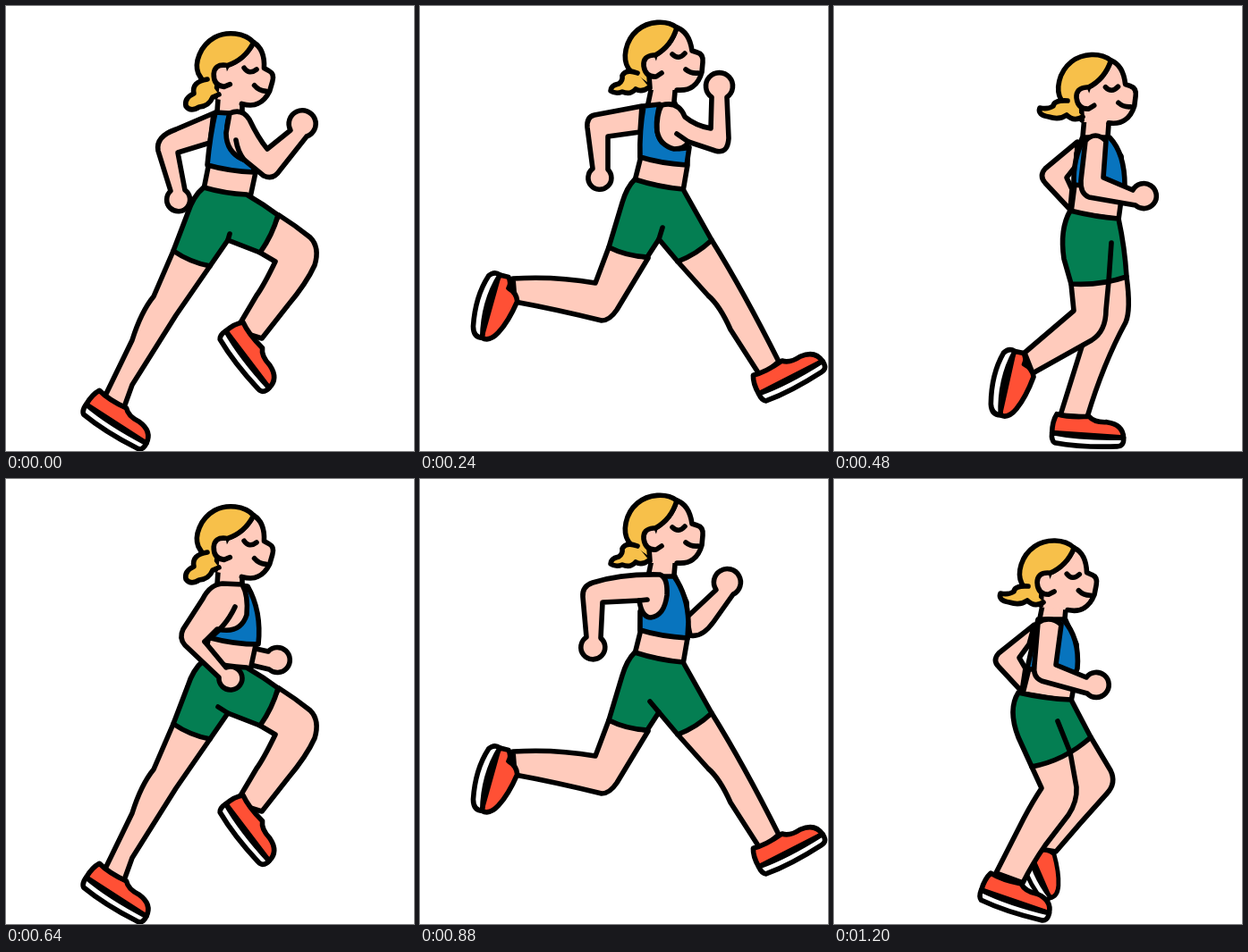
These frames come from a looping animation (456 px wide and 498 px high, 1.28 s). An HTML page:

```html
<!DOCTYPE html>
<html lang="en">
<head>
<meta charset="utf-8">
<title>Runner</title>
<style>
  html, body { margin: 0; width: 100%; height: 100%; overflow: hidden; background: #fff; }
  svg { display: block; width: 100%; height: 100%; }
  path { stroke: #000; stroke-width: 5.6; stroke-linejoin: round; stroke-linecap: round; }
  .skin { fill: #ffcbbc; }
  .bare { fill: #ffcbbc; stroke: none; }
  .green { fill: #047e52; }
  .blue { fill: #0874be; }
  .red { fill: #ff5035; }
  .white { fill: #fff; }
  .hair { fill: #f7c04a; }
  .line { fill: none; }
  g[data-scene] { visibility: hidden; }
</style>
</head>
<body>
<svg id="stage" viewBox="0 0 456 498"></svg>
<script>
const shape = cls => d => `<path class="${cls}" d="${d}"/>`;
const [skin, bare, green, blue, red, white, hair, line] =
  ['skin', 'bare', 'green', 'blue', 'red', 'white', 'hair', 'line'].map(shape);

const place = (x, y, turn, art) =>
  `<g transform="translate(${x} ${y}) rotate(${turn})">${art}</g>`;

// Shoes: origin at the middle of the ankle opening, toe to the right.
const flatShoe =
  red('M-18,-2 Q-4,2 18,0 Q24,7 38,6 Q56,8 57,23 L-23,19 Q-23,6 -18,-2Z') +
  white('M-23,19 Q10,25 57,23 Q58,33 50,33 Q10,35 -20,30 Q-24,27 -23,19Z');
const bentShoe =
  red('M-20,5 Q-14,0 -8,2 Q-5,-8 4,-11 Q28,-7 43,1 Q56,8 53,18 L-20,16Z') +
  white('M-20,15 Q14,26 53,17 Q55,27 43,30 Q10,36 -16,27 Q-23,22 -20,15Z');
const shoe = (x, y, turn) => place(x, y, turn, flatShoe);
const bent = (x, y, turn) => place(x, y, turn, bentShoe);

// Head: origin at the ear.
const backHair = hair('M26,-43 C14,-52 -6,-50 -18,-40 C-32,-28 -35,-8 -28,3 Q-21,12 -12,18 Q-7,22 -4,25 L-5,11 L2,-12 Q20,-22 26,-43Z');
const face =
  bare('M0,-12 L-5,27 L27,27 L27,-22Z') +
  skin('M2,-12 Q20,-22 26,-43 Q40,-38 43,-17 L49,-15 Q56,-13 55,-4 L54,7 Q51,18 44,23 Q38,28 26,27');
const features =
  skin('M0,-12 Q-12,-11 -11,0 Q-9,13 3,12 L9,8') +
  line('M21,-13 Q28,-6 35,-14') +
  line('M36,4 Q42,9 50,8');

const tails = {
  low: 'M-18,4 Q-36,7 -33,20 Q-44,25 -42,34 Q-37,41 -27,35 Q-16,34 -12,24 L-5,21',
  mid: 'M-18,8 Q-31,3 -35,11 Q-34,17 -39,20 Q-48,22 -48,28 Q-42,32 -35,29 Q-26,33 -20,26 Q-13,30 -5,24',
  high: 'M-21,3 Q-36,2 -37,9 Q-43,13 -52,11 Q-55,19 -42,21 Q-30,25 -22,19 Q-14,27 -4,21'
};

const bodies = {
  push: {
    head: [243, 78, 11], tail: 'low',
    torso: 'M238,90 L236,118 L229,150 L226,180 L221,205 L273,214 L279,186 L276,140 L264,118 L264,95Z',
    legs: skin('M187,274 L165,325 Q151,342 141,374 L109,440 L132,449 L141,424 L190,346 L228,291Z') +
      shoe(119, 441, 30) +
      skin('M305,234 Q324,246 340,259 Q351,270 345,290 Q336,310 315,335 L286,372 L257,363 L280,324 Q288,313 301,286 L284,276Z') +
      shoe(275, 369, 50),
    shorts: 'M221,203 Q245,210 269,211 Q288,222 304,234 Q298,256 284,276 L248,262 L228,291 Q206,287 187,274 L203,232 Q209,213 221,203Z'
  },
  fly: {
    head: [253, 61, 3], tail: 'mid',
    torso: 'M253,74 L247,103 L239,134 L238,166 L232,190 L286,201 L291,172 L290,130 L276,101 L278,79Z',
    legs: skin('M199,262 L175,300 Q130,322 68,348 L78,374 Q130,357 180,342 Q203,336 214,320 L241,284Z') +
      bent(71, 362, 75) +
      skin('M330,243 L357,275 Q374,312 404,366 L384,381 Q355,348 330,314 L291,276Z') +
      shoe(391, 373, -40),
    shorts: 'M232,188 Q260,196 286,199 Q310,218 330,243 Q314,263 291,276 L262,256 L241,284 Q218,276 199,262 L216,214 Q222,197 232,188Z'
  },
  reach: {
    head: [261, 67, 0], tail: 'mid',
    torso: 'M261,80 L255,109 L247,140 L246,172 L240,196 L294,207 L299,178 L298,138 L284,107 L286,85Z',
    legs: skin('M211,270 L196,310 Q150,302 104,305 L106,331 Q150,339 203,352 Q212,352 220,340 L255,282Z') +
      bent(99, 324, 104) +
      skin('M326,262 Q362,320 401,398 L381,415 L347,362 Q335,335 322,324 L288,286Z') +
      shoe(389, 406, -30),
    shorts: 'M240,194 Q268,203 294,205 L326,262 Q309,278 288,286 L267,261 L254,281 Q231,280 211,270 L226,220 Q231,203 240,194Z'
  },
  land: {
    head: [274, 74, 0], tail: 'high',
    torso: 'M274,85 L268,113 L262,145 L262,178 L254,207 L308,212 L313,186 L312,140 L299,115 L301,90Z',
    legs: skin('M239,281 L236,319 L155,312 L152,335 L240,361 Q252,364 260,348 Q275,322 284,287Z') +
      bent(147, 327, 118) +
      skin('M332,271 Q347,295 352,320 L357,421 L333,428 Q328,385 318,360 L316,333 L289,291Z') +
      shoe(350, 421, -9),
    shorts: 'M251,204 Q280,210 309,210 Q322,240 333,270 Q315,286 289,291 L284,287 Q258,286 239,281 L238,245 Q240,220 251,204Z'
  },
  stand: {
    head: [282, 103, 2], tail: 'high',
    torso: 'M281,112 L278,146 L271,165 L269,200 L265,231 L318,239 L323,202 L321,168 L306,146 L308,118Z',
    legs: skin('M305,305 L327,303 Q332,340 326,354 Q301,400 283,460 L253,458 L278,378Z') +
      shoe(267, 459, 1) +
      skin('M265,311 L268,341 L213,388 L222,411 L288,374 Q304,364 304,340 L307,308Z') +
      bent(213, 409, 101),
    shorts: 'M264,229 Q292,236 318,238 Q325,270 327,303 Q298,313 265,311 L257,283 Q252,250 264,229Z'
  },
  swing: {
    head: [238, 117, 6], tail: 'high',
    torso: 'M236,126 L230,156 L222,185 L218,212 L211,240 L265,249 L270,222 L271,185 L258,156 L260,134Z',
    legs: skin('M262,306 L287,289 L309,326 Q316,340 305,352 Q275,385 248,417 L230,414 L262,375Z') +
      `<g transform="translate(236 421) rotate(65) scale(.86)">${bentShoe}</g>` +
      skin('M221,322 L232,346 Q222,361 212,380 L181,441 L211,452 Q222,430 236,410 L262,376 Q272,361 271,345 L264,306Z') +
      shoe(192, 448, 16),
    shorts: 'M206,239 Q236,246 265,247 L287,289 Q258,315 221,322 L206,289 Q194,258 206,239Z'
  }
};

const standTop = 'M280,147 L308,147 Q325,165 325,201 L300,203 L268,200 Q267,170 280,147Z';
const swingTop = 'M228,157 L256,157 Q275,178 272,212 L268,222 L216,212Z';

// Upper bodies; "ahead" and "behind" tell where the near arm is.
const uppers = {
  pushAhead: {
    far: 'M232,120 L190,138 Q167,146 170,162 L184,207 A13,13 0 1 0 200,206 L192,164 L228,153Z',
    top: 'M234,119 L250,120 Q241,150 256,166 Q264,174 276,173 L277,186 Q250,185 225,178 Q228,145 234,119Z',
    near: 'M250,120 Q264,114 272,127 Q282,148 292,160 L318,139 A15,15 0 1 1 336,146 L306,184 Q299,195 288,190 L266,172 Q246,164 246,142Z',
    folds: 'M266,172 Q259,163 257,150 M248,262 L250,255'
  },
  pushBehind: {
    far: 'M275,189 L293,193 A14,14 0 1 1 294,213 L273,208Z',
    top: 'M262,119 L270,120 Q286,148 282,185 Q255,185 229,178 L240,160Z',
    near: 'M242,117 Q228,118 220,134 L198,168 Q193,178 200,186 L238,222 A13,13 0 1 0 246,211 L222,182 L236,168 Q262,174 269,152 Q271,130 264,118Z',
    folds: 'M222,182 Q245,167 256,143 M248,262 L237,255'
  },
  reachAhead: {
    far: 'M248,112 L195,122 Q186,124 187,136 L193,182 A13,13 0 1 0 210,183 L210,146 L246,141Z',
    top: 'M250,112 L268,110 Q260,140 270,152 Q283,163 301,158 L298,178 Q268,176 246,169 Q245,140 250,112Z',
    near: 'M270,111 Q289,106 296,124 Q308,134 325,137 L326,102 A15,15 0 1 1 343,102 L345,148 Q344,166 330,162 L300,152 Q296,160 284,160 Q268,156 265,140 Q264,122 270,111Z',
    folds: 'M300,152 L287,143 M267,261 L271,248'
  },
  reachBehind: {
    far: 'M298,155 L331,124 A15,15 0 1 1 350,129 L328,160 Q315,178 302,175Z',
    top: 'M268,109 L284,109 Q299,130 300,160 L299,178 Q268,176 246,169 L246,148 L258,130Z',
    near: 'M268,107 Q225,106 193,116 Q181,120 182,132 L186,177 A13.5,13.5 0 1 0 202,178 L204,138 L245,136 Q248,155 258,155 Q273,153 276,130 Q277,110 268,107Z',
    folds: 'M245,136 L254,135 M267,261 L257,249'
  },
  landAhead: {
    far: 'M264,118 L214,145 Q206,150 210,160 L233,202 A13,13 0 1 0 248,196 L232,162 L262,150Z',
    top: 'M268,117 L282,117 Q274,148 284,160 Q298,172 313,167 L312,187 Q285,186 261,179 Q262,145 268,117Z',
    near: 'M284,117 Q302,112 308,130 Q314,148 322,158 L346,143 A14,14 0 1 1 358,153 L334,182 Q325,190 314,184 L302,170 Q280,168 278,146 Q278,128 284,117Z',
    folds: 'M302,170 L295,155 M287,289 L281,266'
  },
  landBehind: {
    far: 'M314,170 L341,148 A14,14 0 1 1 350,164 L318,187Z',
    top: 'M290,115 L300,116 Q319,142 316,170 L312,187 Q285,186 261,179 L262,155Z',
    near: 'M285,114 Q268,112 256,126 L226,150 Q220,157 224,166 L256,204 A13,13 0 1 0 264,196 L249,161 L262,158 Q268,168 281,166 Q298,158 298,140 Q298,122 290,114Z',
    folds: 'M249,161 L287,138 M289,291 L269,260'
  },
  standAhead: {
    far: 'M272,152 L236,182 Q229,190 236,198 L264,228 L266,205 L260,192 L271,178Z',
    top: standTop,
    near: 'M281,151 Q292,139 304,151 L301,192 L334,206 A14,14 0 1 1 337,223 L285,214 Q275,210 276,195Z',
    folds: 'M310,265 L307,308'
  },
  standBehind: {
    far: 'M312,190 L330,188 A13,13 0 1 1 331,205 L314,212Z',
    top: standTop,
    near: 'M279,150 Q292,140 304,152 L294,192 L322,208 A14,14 0 1 1 322,225 L270,212 Q260,208 263,196Z',
    folds: 'M310,265 L307,308'
  },
  swingAhead: {
    far: 'M224,163 L184,195 Q177,203 184,210 L210,238 L214,212 L207,200 L218,185Z',
    top: swingTop,
    near: 'M228,161 Q241,152 254,163 L248,208 L282,222 A14,14 0 1 1 283,240 L232,226 Q222,222 224,208Z',
    folds: 'M250,271 L264,306'
  },
  swingBehind: {
    far: 'M262,213 L283,212 A13,13 0 1 1 284,229 L262,232Z',
    top: swingTop,
    near: 'M228,161 Q242,153 253,164 Q253,185 239,206 L262,223 A13,13 0 1 1 262,240 L214,224 Q204,218 210,206Z',
    folds: 'M250,271 L264,306'
  }
};

// start ms, body, upper body, shift of the upper body
const steps = [
  [0, 'push', 'pushAhead'],
  [80, 'fly', 'reachAhead', -8, -6],
  [240, 'reach', 'reachAhead'],
  [400, 'land', 'landAhead'],
  [480, 'stand', 'standAhead'],
  [560, 'swing', 'swingBehind'],
  [640, 'push', 'pushBehind'],
  [720, 'fly', 'reachBehind', -8, -6],
  [880, 'reach', 'reachBehind'],
  [1040, 'land', 'landBehind'],
  [1120, 'stand', 'standBehind'],
  [1200, 'swing', 'swingAhead']
];
const LOOP = 1280;

function draw([, bodyName, upperName, dx = 0, dy = 0]) {
  const body = bodies[bodyName], upper = uppers[upperName];
  const [hx, hy, turn] = body.head;
  const shift = art => place(dx, dy, 0, art);
  return '<g data-scene>' +
    shift(skin(upper.far)) +
    skin(body.torso) + body.legs + green(body.shorts) +
    shift(blue(upper.top) + skin(upper.near) + line(upper.folds)) +
    place(hx, hy, turn, face + backHair) +
    place(hx, hy, 0, hair(tails[body.tail])) +
    place(hx, hy, turn, features) + '</g>';
}

const stage = document.getElementById('stage');
stage.innerHTML = steps.map(draw).join('');
const scenes = [...stage.children];
let shown = -1;

function show(now) {
  const t = now % LOOP;
  const next = steps.findLastIndex(([start]) => start <= t);
  if (next !== shown) {
    scenes.forEach((g, i) => { g.style.visibility = i === next ? 'visible' : 'hidden'; });
    shown = next;
  }
}

const begin = performance.now();
function tick() {
  show(performance.now() - begin);
  requestAnimationFrame(tick);
}
tick();
</script>
</body>
</html>
```
